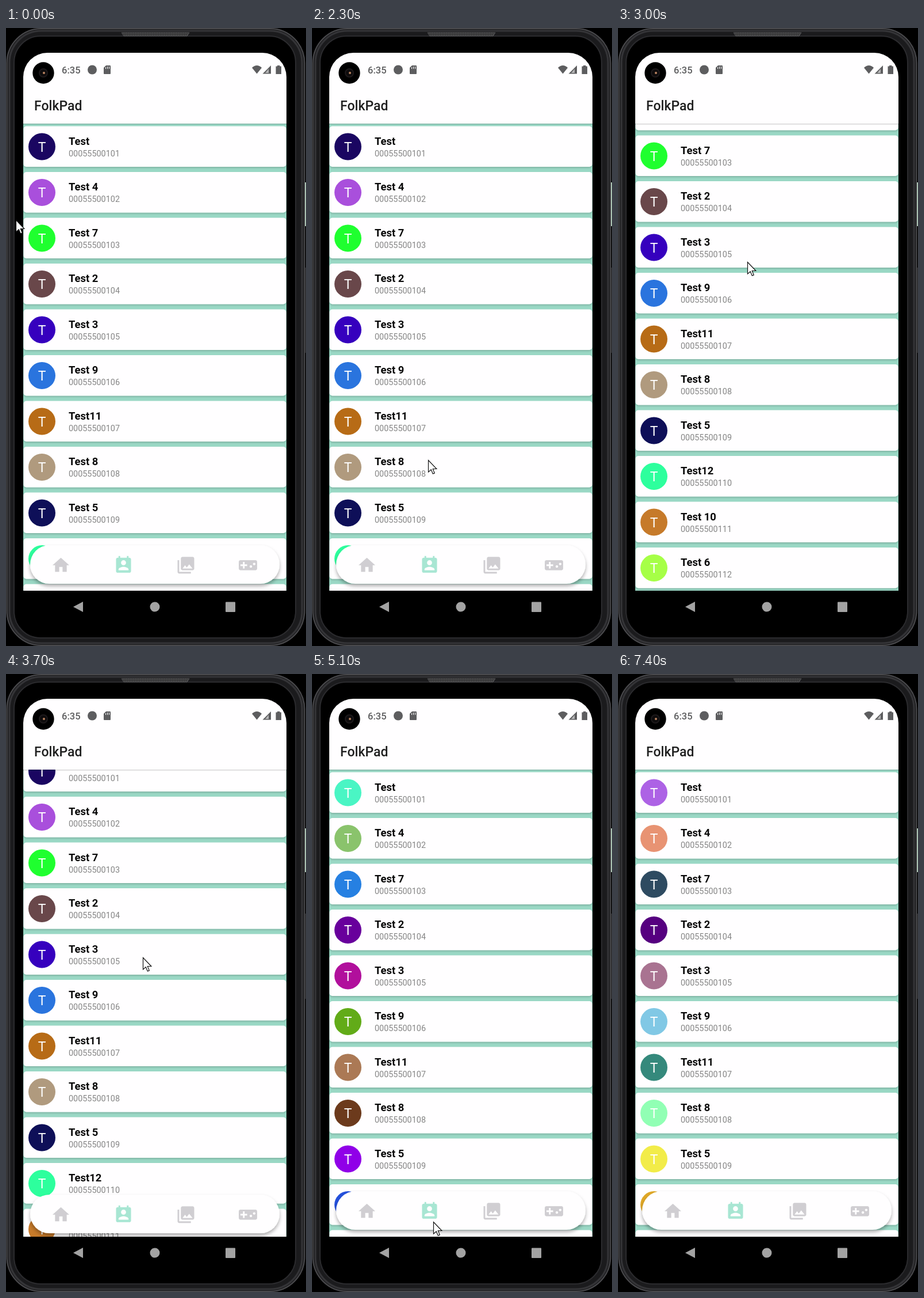
These frames come from a looping animation (522 by 1073 pixels, 7500 ms). An HTML page:

```html
<!DOCTYPE html>
<html lang="en">
<head>
<meta charset="utf-8">
<title>Contact list</title>
<style>
  html, body { margin: 0; width: 100%; height: 100%; overflow: hidden; background: #000; }
  svg { display: block; width: 522px; height: 1073px; font-family: Roboto, sans-serif; }
  .name { font-size: 18.4px; font-weight: 700; fill: #080808; }
  .phone { font-size: 14.4px; fill: #858585; }
  .initial { font-size: 23px; fill: #fff; text-anchor: middle; }
</style>
</head>
<body>
<svg viewBox="0 0 522 1073">
  <defs>
    <clipPath id="listClip"><path d="M30 166H488V977H30z"/></clipPath>
    <filter id="cardShadow" x="-5%" y="-10%" width="110%" height="130%">
      <feDropShadow dx="0" dy="2" stdDeviation="1.8" flood-opacity=".17"/>
    </filter>
    <filter id="barShadow" x="-10%" y="-20%" width="120%" height="150%">
      <feDropShadow dx="0" dy="4" stdDeviation="3" flood-opacity=".32"/>
    </filter>
    <pattern id="mesh" width="3" height="3" patternUnits="userSpaceOnUse">
      <path d="M0 0L3 3M3 0L0 3" stroke="#666" stroke-width=".8"/>
    </pattern>
  </defs>

  <!-- Phone body -->
  <path d="M519 268h3v76h-3z" fill="#c9e9d3"/>
  <path d="M519 416h3v148h-3z" fill="#29292b"/>
  <rect x="1.5" y="1" width="518" height="1071" rx="60" fill="#1f1f21" stroke="#4a4a4d" stroke-width="2"/>
  <rect x="6" y="5" width="509" height="1063" rx="55" fill="#1b1b1d" stroke="#343437" stroke-width="3"/>
  <rect x="14" y="14" width="490" height="1045" rx="46" fill="#000" stroke="#2b2b2e" stroke-width="2"/>
  <path d="M201 8H319L315 14H205z" fill="url(#mesh)" stroke="#505053"/>

  <!-- Screen -->
  <path d="M30 977V85A42 42 0 0 1 72 43H446A42 42 0 0 1 488 85V977z" fill="#fffeff"/>
  <g clip-path="url(#listClip)">
    <path d="M30 166H488V977H30z" fill="#9ad8c5"/>
    <g id="list"></g>
    <path d="M30 166H488" stroke="#000" stroke-opacity=".16" stroke-width="3"/>
    <g id="bar">
      <rect x="42" y="898" width="434" height="67" rx="33.5" fill="#fffeff" filter="url(#barShadow)"/>
    </g>
  </g>

  <!-- Status and title -->
  <circle cx="65" cy="78" r="18.700"/>
  <circle cx="65" cy="78" r="7" fill="#0d0b0c" stroke="#1d191b" stroke-width="2"/>
  <circle cx="66" cy="78" r="2" fill="#b98361"/>
  <g fill="#5d5d5f">
    <text x="97" y="79" font-size="16.5" font-weight="500">6:35</text>
    <circle cx="150" cy="72.5" r="8"/>
    <path d="M174 65h7q1 0 1 1v13q0 1-1 1h-10q-1 0-1-1V69z"/>
    <path d="M428 69Q436.500 61 445 69L436.500 79.500z"/>
    <path d="M461 65V79.500H446.500z"/>
    <path d="M472 66.500V65h4.500v1.500H479V80h-9.500V66.500z"/>
  </g>
  <path d="M457 71v7h-6z" fill="#b7b7b8"/>
  <path d="M173.500 68v3M176.500 67v4M179.500 67v4" stroke="#fff"/>
  <text x="49" y="143" font-size="23" font-weight="500" fill="#202020">FolkPad</text>

  <!-- System buttons -->
  <g fill="#a3a3a3">
    <path d="M117 1005L134 996V1014z"/>
    <circle cx="259" cy="1005" r="8.500"/>
    <rect x="382" y="996.500" width="17" height="17.500" rx="1"/>
  </g>

  <path id="cursor" d="M.5 .5V21L5.300 16.800L8.300 24L11.300 22.800L8.300 15.500H14.800z"
    fill="#fff" stroke="#111" stroke-width="1.200"/>
</svg>
<script>
const LOOP = 7500, STEP = 100, ROW_PITCH = 79.5;

const contacts = ["Test", "Test 4", "Test 7", "Test 2", "Test 3", "Test 9",
  "Test11", "Test 8", "Test 5", "Test12", "Test 10", "Test 6"];

const palettes = [
  { from: 0, colors: "#1a0661 #a94fdc #1fff2f #69474a #3600be #2a74de #b76b16 #b09a7e #0e0f58 #2dff9d #c67a2a #a6ff47" },
  { from: 5000, colors: "#4af5c4 #8ac36c #2680e2 #68009c #b10f9c #62ab18 #ab7955 #6c3a1c #9000e8 #2450dc #c67a2a #a6ff47" },
  { from: 5900, colors: "#ad62e5 #e89373 #2e4b61 #560080 #a97391 #81c8e5 #35897c #91ffb4 #f2ec49 #e0a828 #c67a2a #a6ff47" }
].map(p => ({ from: p.from, colors: p.colors.split(" ") }));

const icons = [
  [95.5, "M10 20v-6h4v6h5v-8h3L12 3 2 12h3v8z"],
  [204.5, "M19 3h-1V1h-2v2H8V1H6v2H5c-1.11 0-2 .9-2 2v14c0 1.1.89 2 2 2h14c1.1 0 2-.9 2-2V5c0-1.1-.9-2-2-2zm-7 3c1.66 0 3 1.34 3 3s-1.34 3-3 3-3-1.34-3-3 1.34-3 3-3zm6 12H6v-1c0-2 4-3.1 6-3.1s6 1.1 6 3.1v1z"],
  [313, "M22 16V4c0-1.1-.9-2-2-2H8c-1.1 0-2 .9-2 2v12c0 1.1.9 2 2 2h12c1.1 0 2-.9 2-2zm-11-4l2.03 2.71L16 11l4 5H8l3-4zM2 6v14c0 1.1.9 2 2 2h14v-2H4V6H2z"],
  [421, "M21 6H3c-1.1 0-2 .9-2 2v8c0 1.1.9 2 2 2h18c1.1 0 2-.9 2-2V8c0-1.1-.9-2-2-2zm-10 7H8v3H6v-3H3v-2h3V8h2v3h3v2zm4.5 2c-.83 0-1.5-.67-1.5-1.5s.67-1.5 1.5-1.5 1.5.67 1.5 1.5-.67 1.5-1.5 1.5zm4-3c-.83 0-1.5-.67-1.5-1.5S18.67 9 19.5 9s1.5.67 1.5 1.5-.67 1.5-1.5 1.5z"]
];

// Each track lists [time, ...values] points joined by straight segments.
const scrollTrack = [[2300, 0], [2400, 12], [2700, 143], [3400, 143], [3700, 37], [3800, 0]];
const barTrack = [[2300, 0], [2500, 82], [3500, 82], [3700, 6], [3800, 0]];
const cursorTrack = [[0, 17, 333], [500, 90, 480], [1300, 202, 750], [2300, 202, 750],
  [2700, 225, 406], [3000, 225, 406], [3300, 225, 395], [3700, 238, 492], [3900, 240, 550],
  [4200, 238, 570], [4700, 211, 951]];
const CURSOR_GONE = 6800;

function sample(track, time) {
  const next = track.findIndex(point => point[0] > time);
  if (next < 0) return track[track.length - 1].slice(1);
  const a = track[Math.max(next - 1, 0)], b = track[next];
  const k = Math.max(0, (time - a[0]) / (b[0] - a[0] || 1));
  return a.slice(1).map((v, i) => v + (b[i + 1] - v) * k);
}

const byId = id => document.getElementById(id);
const list = byId("list"), bar = byId("bar"), cursor = byId("cursor");

list.innerHTML = contacts.map((name, i) => `
  <g transform="translate(0 ${i * ROW_PITCH})">
    <rect x="30.5" y="170.5" width="457" height="70.5" rx="5" fill="#fffeff" filter="url(#cardShadow)"/>
    <circle cx="62.5" cy="206" r="23.5"/>
    <text class="initial" x="62.5" y="214.5">T</text>
    <text class="name" x="109" y="202.8">${name}</text>
    <text class="phone" x="109" y="222.5">000555001${String(i + 1).padStart(2, "0")}</text>
  </g>`).join("");

bar.innerHTML += icons.map(([x, path], i) => `
  <path transform="translate(${x} 932) scale(1.45) translate(-12 -11.5)"
    fill="${i === 1 ? "#a8e6d3" : "#d0ced2"}" d="${path}"/>`).join("");

const avatars = list.querySelectorAll("circle");
const shift = (node, x, y) => node.setAttribute("transform", `translate(${x} ${y})`);

function draw(now) {
  const time = Math.floor(now % LOOP / STEP) * STEP;
  shift(list, 0, -sample(scrollTrack, time)[0]);
  shift(bar, 0, sample(barTrack, time)[0]);
  shift(cursor, ...sample(cursorTrack, time));
  cursor.setAttribute("visibility", time < CURSOR_GONE ? "visible" : "hidden");
  const { colors } = palettes.filter(p => p.from <= time).pop();
  avatars.forEach((avatar, i) => avatar.setAttribute("fill", colors[i]));
}

const start = performance.now();
function tick() {
  draw(performance.now() - start);
  requestAnimationFrame(tick);
}
tick();
</script>
</body>
</html>
```
